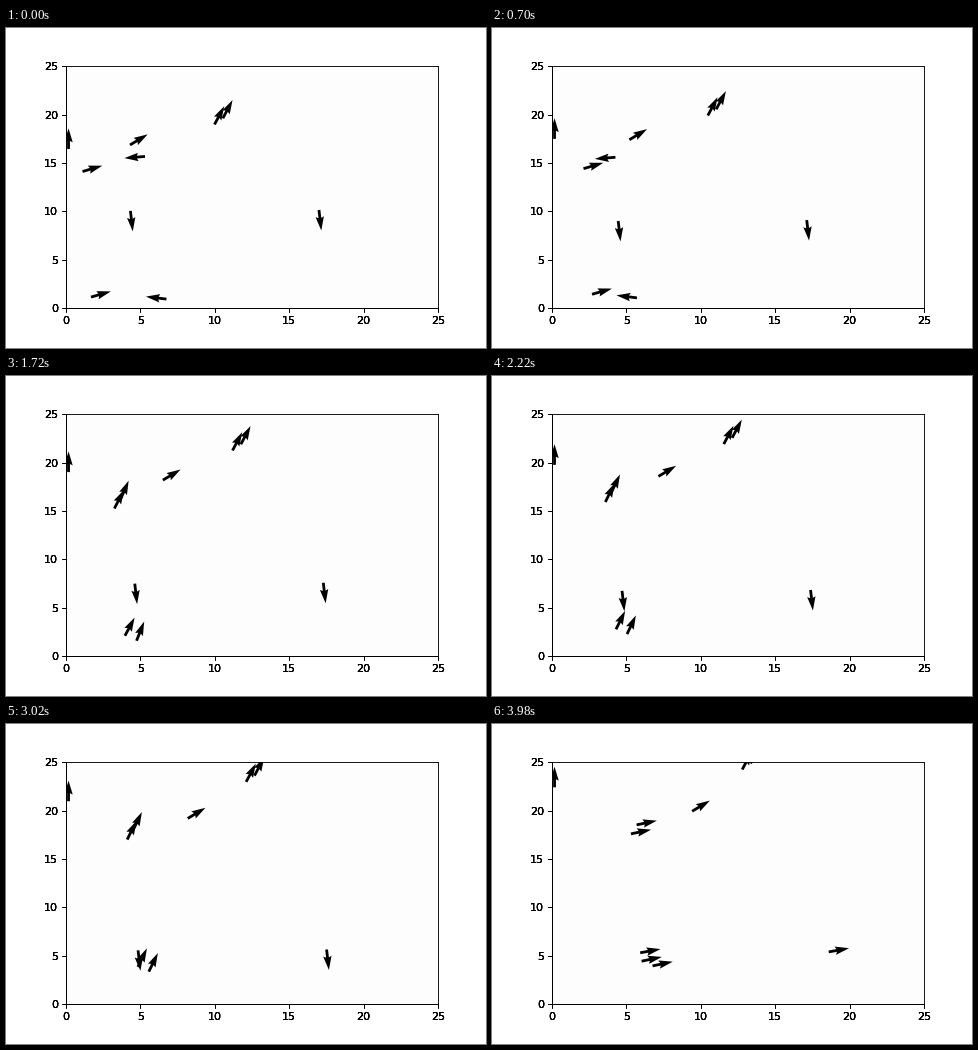
Animation, 480 px wide and 320 px high, one loop 4000 ms. Source, as a matplotlib script:

```python
import numpy as np
import matplotlib.pyplot as plt
from matplotlib.animation import FuncAnimation

SIZE = 25
FRAMES = 200
SPEED = 0.03
RANGE = 1.03     # birds closer than this react to each other
RISE = 64        # heading of a pair that has just met, degrees
CRUISE = 11.3    # heading of the flock once a rising bird meets another
LAG = 0.1        # share of a turn that fades out instead of jumping
FADE = 0.935

# x, y, heading: the flock comes first, then the loners
FLOCK = [
    (1.11, 14.12, 16.5), (5.31, 15.68, 184.5),
    (1.68, 1.13, 16), (6.75, 0.92, 173),
    (4.33, 10.05, -83.5), (17.0, 10.14, -83.5),
]
LONERS = [
    (9.98, 18.99, 62), (10.54, 19.63, 62),
    (4.30, 16.87, 31), (0.17, 16.45, 90),
]


def meetings(pos, goal):
    """Pairs of nearby birds that fly in different directions."""
    gap = np.linalg.norm(pos[:, None] - pos[None], axis=-1)
    return np.argwhere(np.triu((gap < RANGE) & (goal[:, None] != goal)))


def simulate():
    birds = np.array(FLOCK + LONERS)
    pos, goal = birds[:, :2].copy(), birds[:, 2].copy()
    drift = np.zeros(len(birds))
    for _ in range(FRAMES):
        old = goal.copy()
        for pair in meetings(pos, old):
            if RISE in old[pair]:
                goal[:len(FLOCK)] = CRUISE
            else:
                goal[pair] = RISE
        drift = np.where(goal != old, LAG * (old - goal), drift * FADE)
        angle = np.radians(goal + drift)
        step = np.column_stack([np.cos(angle), np.sin(angle)])
        yield pos.copy(), step
        pos += SPEED * step


def add_axes(face):
    return fig.add_axes([0.125, 0.125, 0.775, 0.755], facecolor=face,
                        xlim=(0, SIZE), ylim=(0, SIZE))


states = list(simulate())
fig = plt.figure(figsize=(6, 4), dpi=80, facecolor="white")
ax = add_axes("#fdfdfd")
# Stacked copies make the tick labels dense
for _ in range(3):
    add_axes("none").spines[["top", "right"]].set_visible(False)

pos, step = states[0]
arrows = ax.quiver(*pos.T, *step.T, scale=18, width=0.0075, color="black")


def update(n):
    pos, step = states[n]
    arrows.set_offsets(pos)
    arrows.set_UVC(*step.T)
    return (arrows,)


anim = FuncAnimation(fig, update, frames=FRAMES, interval=20,
                     repeat=True, repeat_delay=0, blit=False)
plt.show()
```
